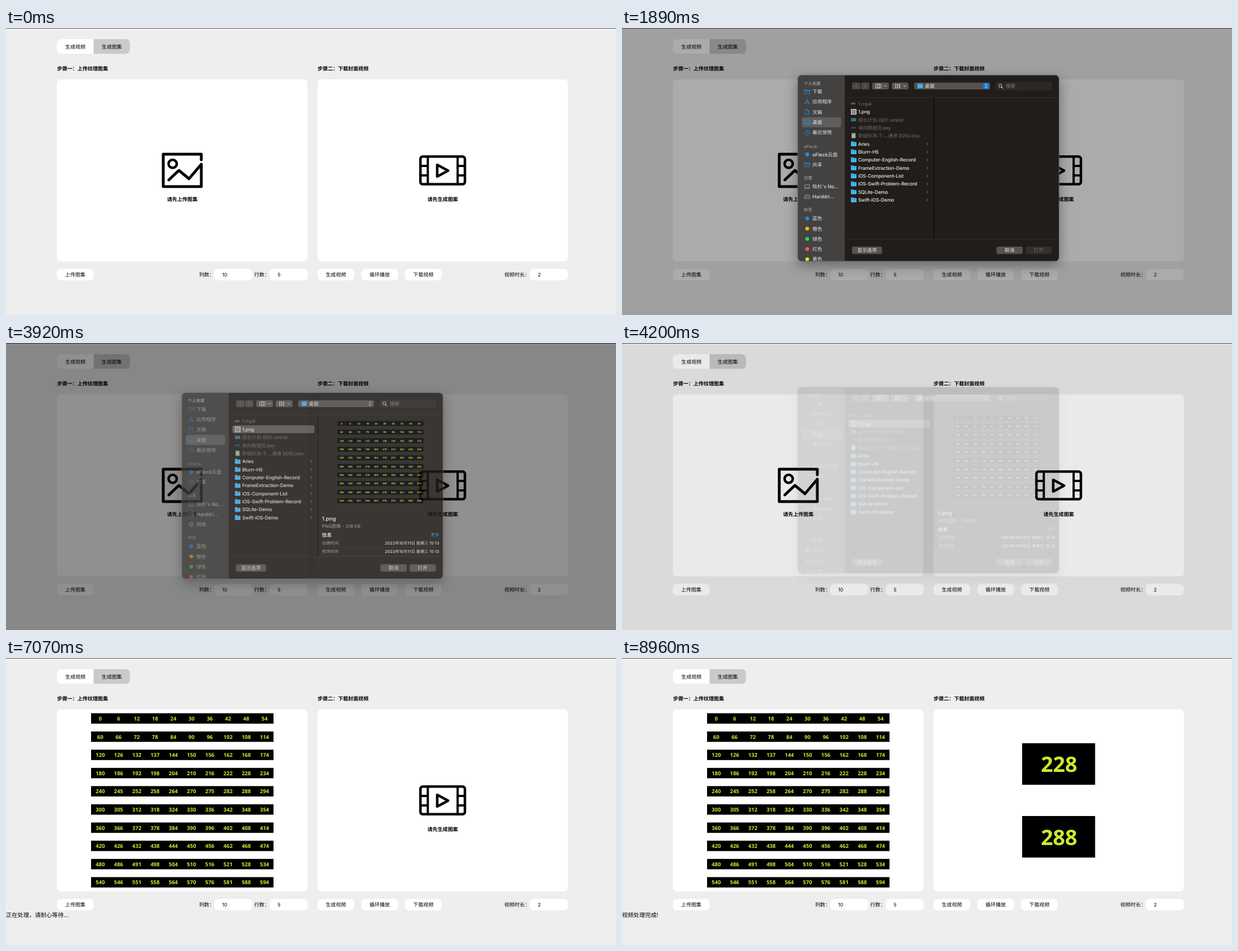
An HTML page for the animation above (9.03 s loop, 1090 by 514 pixels).

```html
<!DOCTYPE html>
<html lang="zh">
<head>
<meta charset="utf-8">
<title>图集生成视频</title>
<style>
html, body { margin: 0; width: 100%; height: 100%; overflow: hidden; background: #eee; }
#stage { display: block; font-family: Inter, "Noto Sans CJK SC", "Noto Sans CJK", sans-serif; }
text { white-space: pre; text-rendering: geometricPrecision; }
#files { letter-spacing: -.2px; }
#dialog { filter: drop-shadow(0 7px 11px rgba(0,0,0,.35)); }
</style>
</head>
<body>
<svg id="stage" width="1090" height="514" viewBox="0 0 1090 514"></svg>
<script>
const LOOP = 9030, STEP = 70;
const stage = document.getElementById('stage');
const $ = id => document.getElementById(id);

// Markup helpers; text is placed by its vertical centre
const text = (x, y, s, size = 9.1, fill = '#000', weight = 400, anchor = 'start') =>
  `<text x="${x}" y="${y + size * .37}" font-size="${size}" fill="${fill}" font-weight="${weight}" text-anchor="${anchor}">${s}</text>`;
const rect = (x, y, w, h, fill, r = 0, more = '') =>
  `<rect x="${x}" y="${y}" width="${w}" height="${h}" rx="${r}" fill="${fill}" ${more}/>`;
const line = (d, color, width = 1, more = '') =>
  `<path d="${d}" fill="none" stroke="${color}" stroke-width="${width}" stroke-linecap="round" stroke-linejoin="round" ${more}/>`;
const group = (id, body, more = '') => `<g id="${id}" ${more}>${body}</g>`;
const at = (x, y, body) => `<g transform="translate(${x} ${y})">${body}</g>`;

// Number atlas: 10 x 10 cells in a 326 px square
const CELL = 32.6;
const early = new Set([138, 246, 276, 306, 492, 522, 552, 582]);
function atlas() {
  let s = '';
  for (let r = 0; r < 10; r++) {
    s += rect(0, r * CELL + 7, 326, 18.6, '#000');
    for (let c = 0; c < 10; c++) {
      const n = (r * 10 + c) * 6;
      s += text(c * CELL + 16.5, r * CELL + 16.4, early.has(n) ? n - 1 : n, 9.5, '#c8ea30', 700, 'middle');
    }
  }
  return group('atlas', s, `font-family="'Open Sans', sans-serif" stroke="#c8ea30" stroke-width="0"`);
}

function page() {
  const button = (x, s) => rect(x, 431.5, 65.5, 20.5, '#fff', 7) + text(x + 32.75, 441.5, s, 9.1, '#000', 400, 'middle');
  const field = (x, label, lx, value) =>
    text(lx, 441.5, label) + rect(x, 431.5, 68, 20.5, '#fff', 7) + text(x + 14.3, 441.5, value, 8.8);
  const picture = line('M291 272 309 255 327 270 349 244V284H281V226H349V236', '#000', 5) +
    '<circle cx="297.8" cy="243.3" r="7.3" fill="none" stroke="#000" stroke-width="4.5"/>';
  const film = rect(740.5, 230.3, 79.5, 49.5, 'none', 4, 'stroke="#000" stroke-width="4.5"') +
    line('M753.7 231V279M807 231V279M741 247H753M741 264H753M807 247H819M807 264H819', '#000', 4) +
    line('M770.5 245 790 255.5 770.5 266Z', '#000', 4.5);
  return rect(0, 0, 1090, 514, '#eee') + rect(0, 0, 1090, 1, '#555') +
    rect(91, 20, 130.5, 26.3, '#cacaca', 7) +
    '<path d="M98 20H156.5V46.3H98a7 7 0 0 1-7-7V27a7 7 0 0 1 7-7z" fill="#fff"/>' +
    text(124, 33.3, '生成视频', 9.1, '#000', 400, 'middle') + text(189, 33.3, '生成图集', 9.1, '#000', 400, 'middle') +
    text(91.3, 72.3, '步骤一：上传纹理图集', 9.1, '#000', 700) + text(556.8, 72.3, '步骤二：下载封面视频', 9.1, '#000', 700) +
    rect(91, 92, 447.5, 326, '#fff', 7) + rect(556.7, 92, 447.5, 326, '#fff', 7) +
    group('noAtlas', picture + text(315, 307, '请先上传图集', 9.1, '#000', 700, 'middle')) +
    group('hasAtlas', at(152, 92, atlas())) +
    group('noVideo', film + text(780.3, 307, '请先生成图案', 9.1, '#000', 700, 'middle')) +
    '<svg id="video" x="715" y="124.6" width="130.4" height="260.8"><use href="#atlas" stroke-width=".12"/></svg>' +
    button(91, '上传图集') + button(556.7, '生成视频') + button(635, '循环播放') + button(713, '下载视频') +
    field(372, '列数：', 345, 10) + field(471, '行数：', 443.5, 5) + field(936, '视频时长：', 890.5, 2) +
    group('focus', rect(956, 436, .8, 11, '#000') + rect(990, 436, 9, 11, '#efefef', 1) +
      line('M992.7 440l1.8-2 1.8 2M992.7 443l1.8 2 1.8-2', '#555', .9)) +
    `<text id="status" x="0" y="463.6" font-size="10.3"></text>`;
}

function sidebar() {
  const blue = '#1793f5', grey = '#9a9896';
  const folder = 'M-4.5-3.5h3l1 1.2h5v6h-9zM-4.5-1h9';
  const ring = 'M-4.2 0a4.2 4.2 0 1 0 8.4 0a4.2 4.2 0 1 0-8.4 0';
  const head = (y, s) => text(325, y, s, 7.4, '#918f8d', 600);
  const item = (y, s, d, color = blue) => at(331, y, line(d, color, .95)) + text(340.3, y, s, 8.7, '#e8e7e6', 500);
  const tag = (y, s, color) => `<circle cx="331" cy="${y}" r="3.4" fill="${color}"/>` + text(340.3, y, s, 8.7, '#e8e7e6', 500);
  const tags = [['蓝色', '#0a95ff'], ['橙色', '#ffb400'], ['绿色', '#1ee04a'], ['红色', '#ff5a50'], ['黄色', '#d3ee1a']];
  return rect(321, 168, 70.5, 18, '#fff', 3.5, 'fill-opacity=".15"') +
    head(107, '个人收藏') +
    group('places',
      item(122, '下载', folder) +
      item(140.4, '应用程序', 'M-3.5 4 .6-4M-.6-4 3.5 4M-4.5 1.6H4.5') +
      item(158.8, '文稿', 'M-3-4.3h3.5l2.5 2.5v6.1h-6zM.5-4.3v2.5h2.5') +
      item(177, '桌面', 'M-4.8-3.5h9.6v7h-9.6zM-3 1.7h6') +
      item(195.3, '最近使用', ring + 'M0-2.5V0l1.8 1') +
      head(220, 'oFleck') + tag(234.5, 'oFleck云盘', blue) +
      item(252.7, '共享', folder) + head(276.6, '位置') +
      item(292, "陆杉's No...", 'M-3.9-3h7.8v5.3h-7.8zM-5.2 3.6h10.4', grey) +
      item(310.2, 'Harddri...', 'M-4.8.3l1.4-3.3h6.8l1.4 3.3v3h-9.6zM-4.8.3h9.6', grey) +
      group('network', item(328.3, '网络', ring + 'M-4.2 0h8.4M0-4.2q-4 4.2 0 8.4q4-4.2 0-8.4', grey)) +
      group('tags', head(352, '标签') + tags.map(([s, c], i) => tag(367.6 + i * 18.25, s, c)).join(''))) +
    rect(392, 93, 4.7, 241, '#bcbbba', 2.3, 'id="scrollbar"');
}

function fileList() {
  const names = ['1.mp4', '1.png', '成长计划-陆杉.xmind', '单向数据流.key', '职级标准-T-...通道 (iOS).xlsx', 'Aries', 'Blurrr-H5',
    'Computer-English-Record', 'FrameExtraction-Demo', 'iOS-Component-List', 'iOS-Swift-Problem-Record', 'SQLite-Demo', 'Swift-iOS-Demo'];
  const icons = [
    rect(409, -2, 8, 3.5, '#5a5855'),
    rect(409.5, -4.3, 9, 9, '#8d8b88', 0, 'stroke="#ddd"'),
    rect(409, -3, 9.5, 6, '#2f7186', 1),
    rect(409, -1.5, 9, 3, '#2b4a63', 1),
    rect(410, -5, 7.5, 9.5, '#7d9b80', 1) + line('M412-2h4M412 0h4M412 2h4', '#dfe8df', .8)];
  const folder = '<path d="M409-3.5q0-1 1-1h3l1 1.2h4q1 0 1 1v5.6q0 1-1 1h-8q-1 0-1-1z" fill="#45b5ec"/>' + rect(409, -2, 10, .7, '#2a8fc8');
  return names.map((s, i) => {
    const dim = i < 5 && i !== 1;
    return at(0, 143.8 + i * 14.36, (icons[i] || folder) + text(422, 0, s, 8.6, dim ? '#6b6865' : '#efeeed', 500) +
      (i > 4 ? line('M544.3-2.2 546.3 0l-2 2.2', '#8b8987', .9) : ''));
  }).join('');
}

function preview() {
  const grey = '#a9a6a3';
  const date = (y, s) => text(564.5, y, s, 7.4, grey, 500) +
    text(774, y, '2023年10月11日 星期三 15:13', 7.3, '#efeeed', 500, 'end') + line(`M565 ${y + 7.7}H774`, '#3b3835', .7);
  return text(564.5, 317.8, '1.png', 9.6, '#efeeed', 600) + text(564.5, 331.6, 'PNG图像 - 318 KB', 8.2, grey) +
    text(564.5, 347, '信息', 8.7, '#efeeed', 700) + text(774, 347, '更多', 7.5, '#2f9df0', 500, 'end') +
    date(361.7, '创建时间') + date(376.5, '修改时间');
}

function dialog() {
  const box = (x, w, fill, more) => rect(x, 106, w, 12.3, fill, 3, more);
  const button = (x, w, s, id) => rect(x, 399.7, w, 13.2, '#55524f', 3.2, `id="${id}"`) +
    text(x + w / 2, 406.2, s, 8.7, '#efeeed', 500, 'middle').replace('<text', `<text id="${id}Label"`);
  const down = x => line(`M${x} 111.2l2 2 2-2`, '#ddd', 1);
  const toolbar = box(411, 15, '#4a4745') + box(427, 15, '#4a4745') +
    line('M419.5 109.3l-2.5 2.8 2.5 2.8M433.5 109.3l2.5 2.8-2.5 2.8', '#82807d', 1) +
    box(447, 30, '#57544f') + rect(453.5, 108.8, 9.5, 6.8, 'none', 1, 'stroke="#ddd" stroke-width=".9"') +
    line('M456.7 109v6.5M459.8 109v6.5', '#ddd', .9) + down(468.5) +
    box(482, 30, '#57544f') + line('M489 109.4h8M489 112.2h8M489 115h8', '#ccc', 2, 'stroke-dasharray="0 3.5"') +
    line('M488.5 109.4h9M488.5 112.2h9M488.5 115h9', '#ccc', 1.5, 'stroke-dasharray="1 2.6"') + down(503) +
    box(522, 135.5, '#55524f') + rect(528, 108, 9.5, 8, '#45b5ec', 1) + rect(528, 110, 9.5, .7, '#2a8fc8') +
    text(541, 112.2, '桌面', 8.7, '#efeeed', 500) +
    rect(645.3, 106.8, 10.8, 10.8, '#1b73e4', 2.5, 'id="stepper"') + line('M648.9 110.8l1.8-2 1.8 2M648.9 113.6l1.8 2 1.8-2', '#fff', 1) +
    rect(668, 105.7, 99.5, 12.8, '#2a2724', 3, 'stroke="#3d3a37" stroke-width=".7"') +
    '<circle cx="676" cy="111.6" r="2.8" fill="none" stroke="#ddd"/>' + line('M678.2 113.8l2.2 2.2', '#ddd', 1.1) +
    text(685.5, 112.2, '搜索', 8.7, '#83807d');
  return '<clipPath id="sheet"><rect x="314" y="92.5" width="467" height="333.5" rx="7"/></clipPath>' +
    `<g clip-path="url(#sheet)">${rect(314, 92, 467, 335, '#211d1a') + rect(314, 92, 84, 335, '#363534', 0, 'id="side"') + sidebar()}</g>` +
    line('M398.5 132.7H780M398.5 386.3H780', '#35322f', .8) + line('M557.7 133V386', '#080706', 1.2) + toolbar +
    rect(404.5, 151, 146.5, 14, '#55524f', 3, 'id="picked"') + group('files', fileList()) +
    group('info', preview()) +
    '<use id="thumb" href="#atlasCopy" transform="translate(592 139.9) scale(.472)"/>' +
    button(411, 53.7, '显示选项', 'options') + button(669, 47, '取消', 'cancel') + button(721, 47, '打开', 'open') +
    rect(314, 92.5, 467, 333.5, 'none', 7, 'stroke="#73706d" stroke-width=".9"');
}

stage.innerHTML = `<defs>${atlas().replace('id="atlas"', 'id="atlasCopy"')}</defs>` + page() +
  rect(0, 0, 1090, 514, '#000', 0, 'id="dim"') + group('dialog', dialog());

// Presence of the dialog, held from each time on
const presence = [[0, 0], [1820, .2], [1890, .59], [1960, .85], [2030, .96], [2100, 1],
  [3920, .78], [3990, .4], [4200, .15], [4270, 0]];
const show = (id, on) => $(id).setAttribute('display', on ? 'inline' : 'none');
const set = (id, name, value) => $(id).setAttribute(name, value);
const clamp = (v, lo, hi) => Math.min(hi, Math.max(lo, v));

function draw(t) {
  const p = presence.filter(k => k[0] <= t).pop()[1];
  const closing = t >= 3920, chosen = t >= 2590, active = t < 3290, loaded = t >= 4410, playing = t >= 7280;

  show('focus', t >= 980 && t < 1330);
  show('noAtlas', !loaded);
  show('hasAtlas', loaded);
  show('noVideo', !playing);
  show('video', playing);
  $('status').textContent = playing ? '视频处理完成!' : t >= 4970 ? '正在处理，请耐心等待...' : '';
  const frame = clamp(Math.floor((t - 7420) / 40), 0, 49);
  set('video', 'viewBox', `${frame % 10 * CELL} ${Math.floor(frame / 10) * CELL} ${CELL} ${CELL * 2}`);

  set('dim', 'opacity', .56 * p);
  show('dialog', p > 0);
  set('dialog', 'opacity', closing ? p : Math.min(1, p * 1.7));
  set('dialog', 'transform', `translate(0 ${(closing ? -16 : -20) * (1 - p)})`);
  const shade = Math.round(54 + 32 * (1 - p));
  set('side', 'fill', `rgb(${shade},${shade - 1},${shade - 2})`);

  show('network', t >= 2520);
  set('tags', 'transform', `translate(0 ${t >= 2520 ? 0 : -18.3})`);
  set('scrollbar', 'opacity', t < 2520 ? 0 : clamp((2870 - t) / 280, 0, 1));
  set('places', 'opacity', active ? 1 : .55);
  show('picked', chosen);
  set('picked', 'fill', active ? '#1659c7' : '#5d5a57');
  show('info', chosen);
  show('thumb', t >= 2730);
  set('stepper', 'fill', active ? '#1b73e4' : '#55524f');
  set('open', 'fill', !chosen ? '#322f2c' : !active ? '#55524f' : t >= 3220 ? '#3b8bf0' : '#1b6fdc');
  set('openLabel', 'fill', chosen ? '#efeeed' : '#74716e');
}

const start = performance.now();
function tick() {
  const t = (performance.now() - start) % LOOP;
  draw(Math.floor(t / STEP) * STEP);
  requestAnimationFrame(tick);
}
tick();
</script>
</body>
</html>
```
